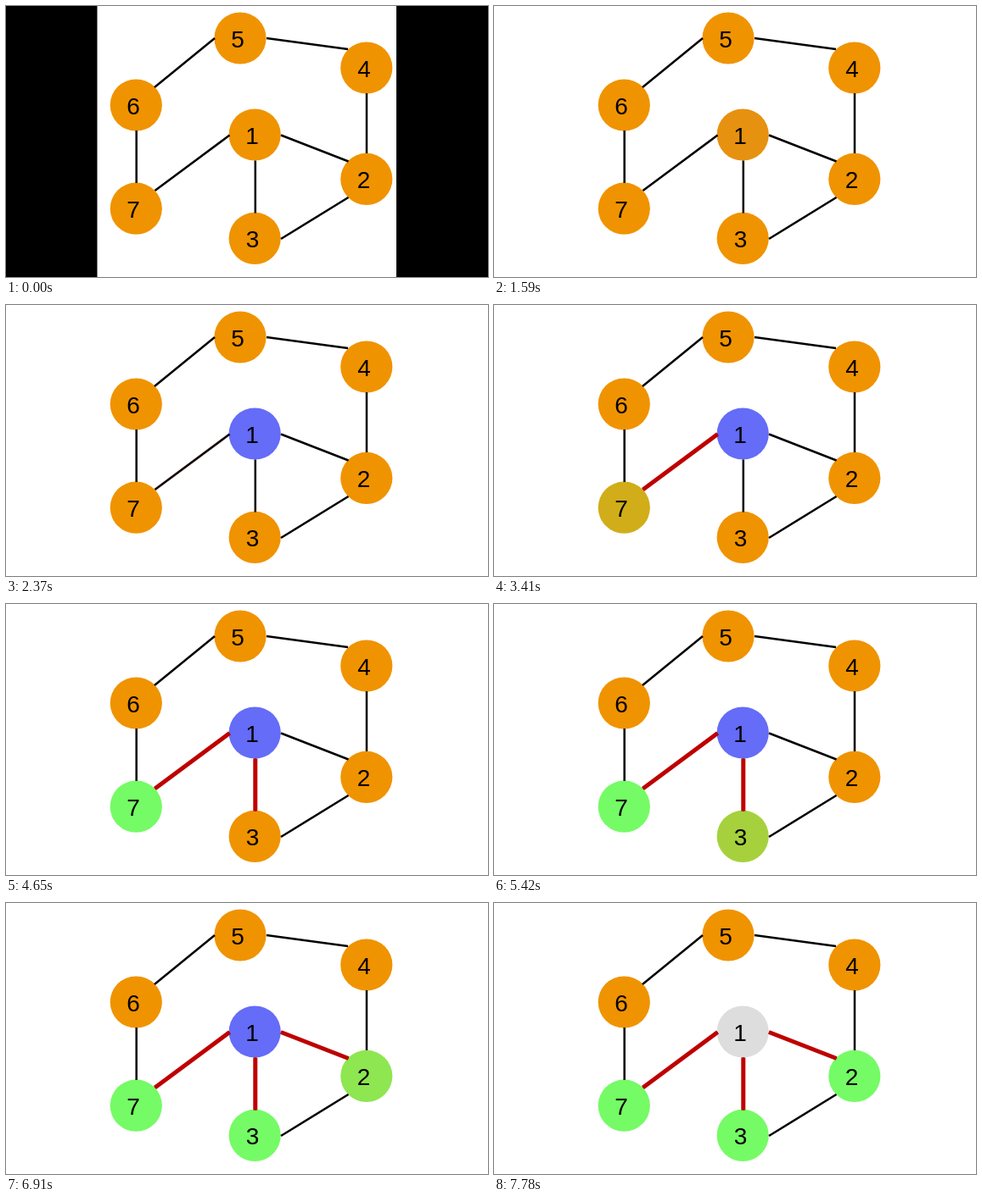
These frames come from a looping animation (568 by 320 pixels, 8000 ms). An HTML page:

```html
<!DOCTYPE html>
<html lang="en">
<head>
<meta charset="utf-8">
<title>Graph traversal</title>
<style>
html, body { margin: 0; width: 100%; height: 100%; overflow: hidden; background: #fff; }
svg { display: block; width: 100vw; height: 100vh; }
text { font: 28px "Liberation Sans", Arial, sans-serif; text-anchor: middle; }
</style>
</head>
<body>
<svg id="stage" viewBox="0 0 568 320"></svg>
<script>
const LOOP = 8000;
const ORANGE = [240, 147, 0], BLUE = [100, 108, 248], GREEN = [117, 251, 101], GREY = [221, 221, 221];
const stage = document.getElementById("stage");

function add(tag, attrs) {
  const el = document.createElementNS("http://www.w3.org/2000/svg", tag);
  for (const k in attrs) el.setAttribute(k, attrs[k]);
  return stage.appendChild(el);
}

// label: centre x, centre y, label x
const nodes = {
  1: [293.2, 152, 290], 2: [424.8, 204.4, 421.5], 3: [293.2, 274.4, 290.5], 4: [424.8, 73, 422],
  5: [276, 38, 273], 6: [153.3, 117, 150], 7: [153.3, 239.2, 150]
};

const edges = {
  "5-6": [246, 38, 175, 96], "5-4": [307, 38, 403, 51], "4-2": [425, 103, 425, 174],
  "6-7": [153.7, 147, 153.7, 209], "2-3": [403.5, 226, 324, 275],
  "1-7": [263.5, 152.5, 175.5, 218], "1-3": [293.8, 182.5, 293.8, 244.5], "1-2": [324, 152.5, 403.5, 183.5]
};

// start, end, number of steps
const recolours = [
  { node: 1, span: [1590, 2070, 16], from: ORANGE, to: BLUE },
  { node: 7, span: [3320, 3770, 16], from: ORANGE, to: GREEN },
  { node: 3, span: [5180, 5600, 15], from: ORANGE, to: GREEN },
  { node: 2, span: [6580, 7000, 15], from: ORANGE, to: GREEN },
  { node: 1, span: [7330, 7780, 15], from: BLUE, to: GREY }
];
const marks = [
  { edge: "1-7", span: [2370, 2890, 16] },
  { edge: "1-3", span: [4170, 4650, 17] },
  { edge: "1-2", span: [5800, 6250, 16] }
];

function line(edge, stroke, width) {
  const [x1, y1, x2, y2] = edges[edge];
  return add("line", { x1, y1, x2, y2, stroke, "stroke-width": width });
}

const discs = {};
for (const n in nodes) {
  const [cx, cy] = nodes[n];
  discs[n] = add("circle", { cx, cy, r: 30.6 });
}
for (const e in edges) line(e, "#000", 2.5);
for (const m of marks) m.el = line(m.edge, "#be0000", 5);
for (const n in nodes) {
  const [, cy, x] = nodes[n];
  add("text", { x, y: cy + 10.5 }).textContent = n;
}
const bars = [add("rect", { x: 0, width: 107.5, height: 320 }), add("rect", { x: 460, width: 108, height: 320 })];

function progress(t, [start, end, steps]) {
  if (t < start) return 0;
  if (t >= end) return 1;
  const step = Math.floor((t - start) / (end - start) * (steps - 1) + 1e-6);
  return (step + 1) / steps;
}

function draw(t) {
  for (const b of bars) b.setAttribute("visibility", t < 60 ? "visible" : "hidden");
  const fills = {};
  for (const { node, span, from, to } of recolours) {
    const p = progress(t, span);
    if (p > 0 || !fills[node]) fills[node] = from.map((c, i) => Math.round(c + (to[i] - c) * p));
  }
  for (const n in discs) discs[n].setAttribute("fill", `rgb(${fills[n] || ORANGE})`);
  for (const m of marks) m.el.setAttribute("opacity", progress(t, m.span));
}

const began = performance.now();
function tick() {
  draw((performance.now() - began) % LOOP);
  requestAnimationFrame(tick);
}
tick();
</script>
</body>
</html>
```
